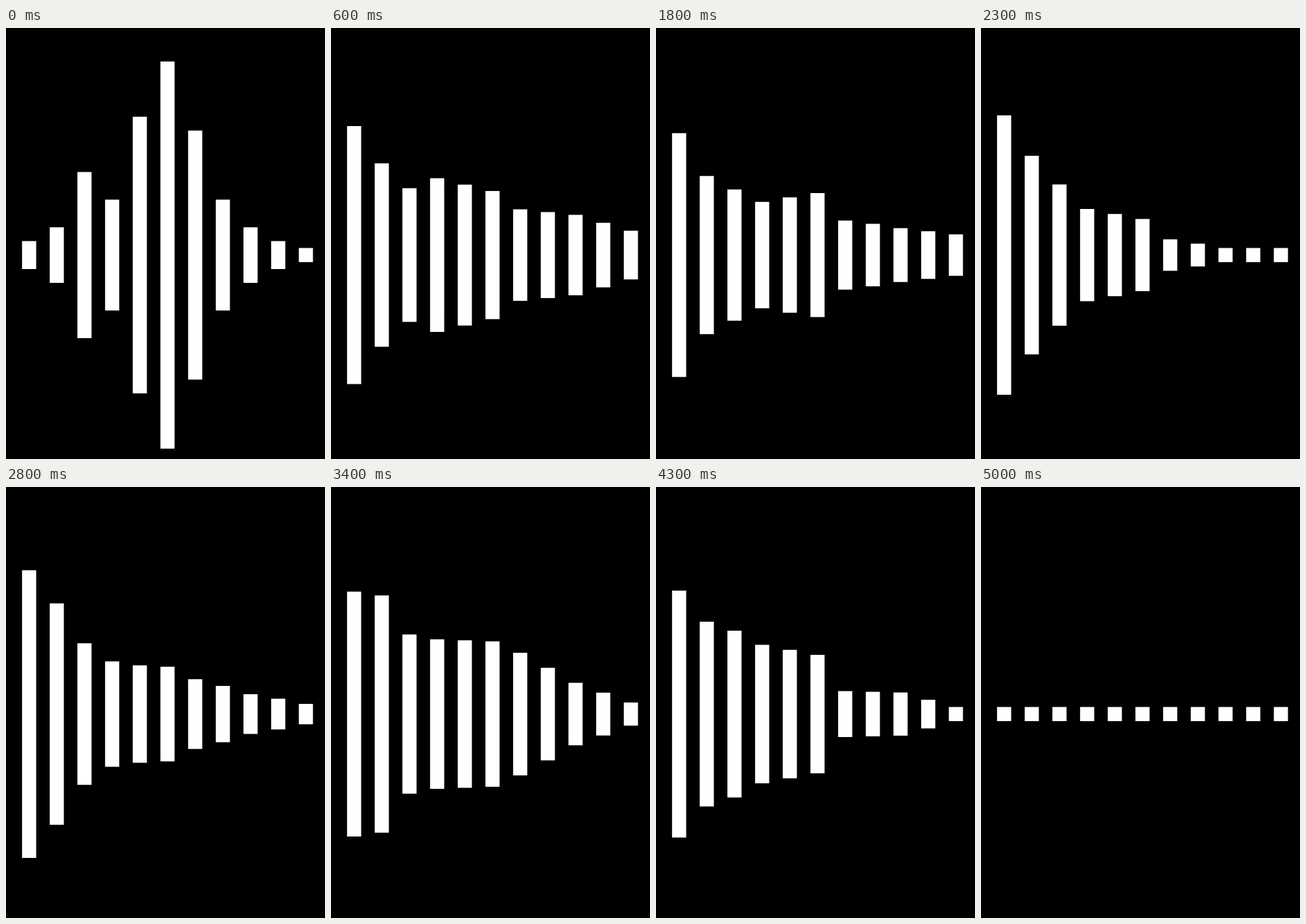
Recreate the animation shown at these times as an HTML page. Size 461x624 px, loop 5100 ms.

```html
<!DOCTYPE html>
<html lang="en">
<head>
<meta charset="utf-8">
<title>Sound bars</title>
<style>
  html, body { margin: 0; width: 100%; height: 100%; overflow: hidden; background: #000; }
  svg { display: block; width: 461px; height: 624px; }
</style>
</head>
<body>
<svg viewBox="0 0 461 624"><path id="bars" fill="#fff"/></svg>
<script>
const LOOP = 5100, STEP = 100, BEAT = 800;
const LEFT = 23.2, PITCH = 40, WIDTH = 20.4, MIDDLE = 328.75, MIN = 20;
const START = 200, FULL = 600, RELEASE = 4300;

// resting shape, in units of the smallest bar
const idle = [2, 4, 12, 8, 20, 28, 18, 8, 4, 2, 1];

// spectrum outline: heights at a few bars, straight lines between
const knots = [0, 1, 2, 3, 5, 6, 8, 10];
const poses = [
  { at: FULL, h: [373, 265, 193, 222, 185, 132, 116, 70] },
  { at: 1400, h: [374, 241, 223, 190, 216, 124, 113, 98] },
  { at: 2300, h: [404, 287, 204, 133, 104, 45, 20, 20] },
  { at: 3400, h: [354, 343, 230, 216, 210, 177, 90, 33] },
  { at: RELEASE, h: [357, 267, 241, 200, 171, 66, 62, 20] }
];

const path = document.getElementById('bars');
const clamp = (x, lo, hi) => Math.min(hi, Math.max(lo, x));
const lerp = (a, b, u) => a + (b - a) * u;

// segment of ascending values that holds x, and the place within it
function locate(values, x) {
  let i = 0;
  while (i < values.length - 2 && x > values[i + 1]) i++;
  return [i, (x - values[i]) / (values[i + 1] - values[i])];
}

function outline(pose, bar) {
  const [i, u] = locate(knots, bar);
  return lerp(pose.h[i], pose.h[i + 1], u);
}

function height(bar, t) {
  if (t < START) return idle[bar] * MIN;
  const now = clamp(t, FULL, RELEASE);
  const [i, u] = locate(poses.map(p => p.at), now);
  const level = lerp(outline(poses[i], bar), outline(poses[i + 1], bar), u);
  const beat = Math.cos(2 * Math.PI * (now - 500) / BEAT - bar * 0.6);
  const h = level * (1 + 0.13 * Math.sin(Math.PI * u) * beat);

  const rise = 1 - (1 - clamp((t - START) / (FULL - START), 0, 1)) ** 2;
  const drop = 8 * ((t - now) / STEP) ** 2;
  return t < FULL ? lerp(MIN, h, rise) : Math.max(MIN, h - drop);
}

function draw(t) {
  const time = Math.floor((t % LOOP) / STEP) * STEP;
  path.setAttribute('d', idle.map((_, i) => {
    const h = height(i, time) + 0.5;
    return `M${LEFT + i * PITCH} ${MIDDLE - h / 2}h${WIDTH}v${h}h${-WIDTH}z`;
  }).join(''));
}

let start;
function tick(now) {
  start ??= now;
  draw(now - start);
  requestAnimationFrame(tick);
}
draw(0);
requestAnimationFrame(tick);
</script>
</body>
</html>
```
